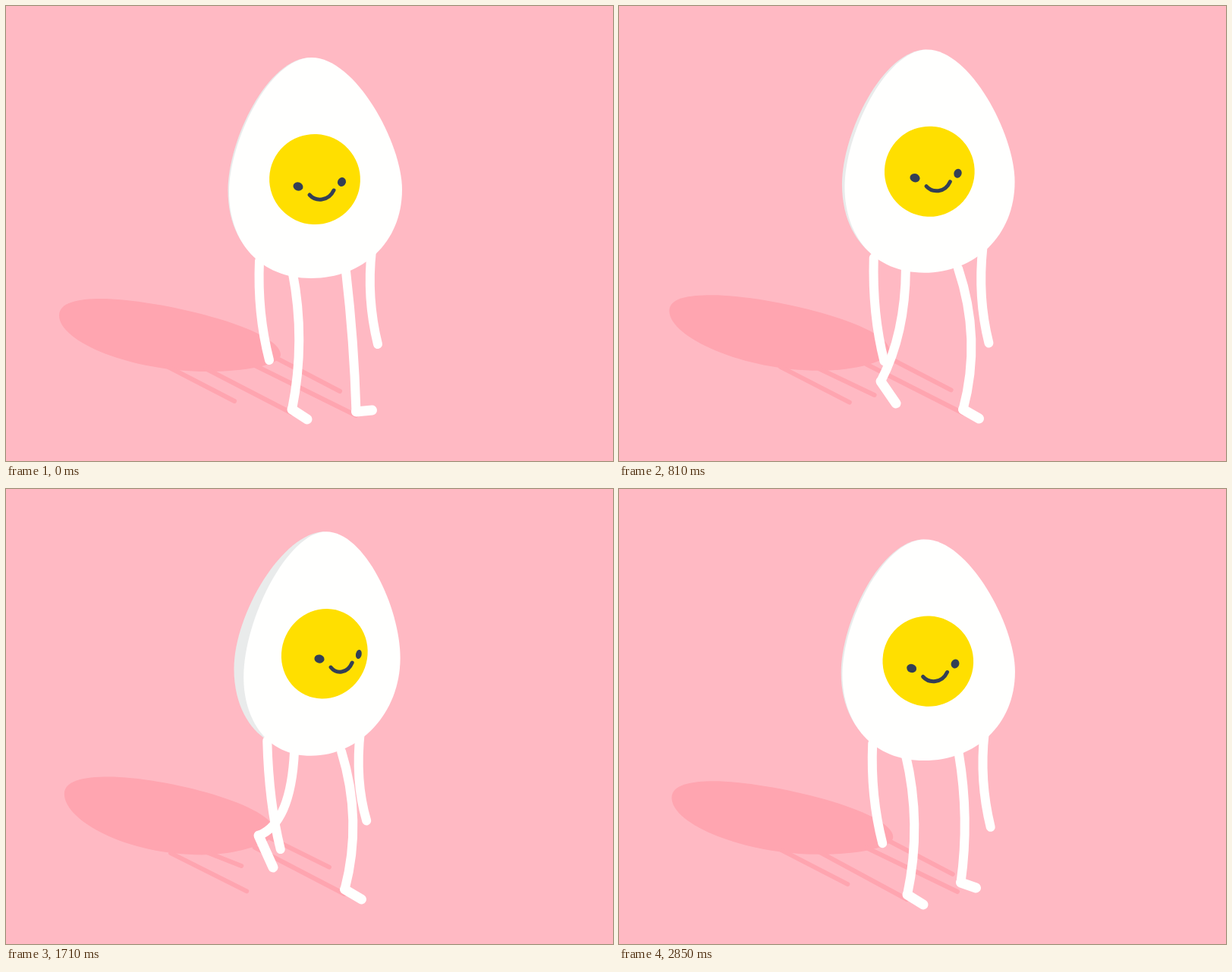
Write an HTML page with a canvas that moves like this. It is 800 px wide and 600 px high and loops after 2.88 s.

```html
<!DOCTYPE html>
<html lang="en">
<head>
<meta charset="utf-8">
<title>Walking egg</title>
<style>
  html, body { margin: 0; width: 100%; height: 100%; overflow: hidden; background: #ffb9c3; }
  canvas { display: block; }
</style>
</head>
<body>
<canvas id="stage" width="800" height="600"></canvas>
<script>
const ctx = document.getElementById('stage').getContext('2d');
const CYCLE = 720, STEP = 30;
const PINK = '#ffb9c3', SHADOW = '#ffa5b0', WHITE = '#fffffe', GREY = '#e9ebeb', YOLK = '#ffdf00', INK = '#333f56';

// Left leg over one stride: time, ankle x y, toe dx dy, bend dx dy, shadow drop
const STRIDE = [
  [0, 377, 532, 20, 13, 18, 0, 5],
  [90, 345, 495, 20, 29, 16, 12, 18],
  [180, 327, 450, 19, 41, 18, 36, 38],
  [270, 333, 457, 19, 42, 19, 39, 40],
  [330, 386, 527, 20, 7, 13, 0, 12],
  [360, 397, 543, 21, -2, 4, 0, 5],
  [450, 389, 540, 21, 12, 28, 0, 5],
  [630, 382, 536, 22, 13, 26, 0, 6],
  [690, 380, 535, 21, 13, 21, 0, 6]
];

// Egg outlines facing left and facing right
const FRONT = [
  'M403 68C460 68 522 180 522 242C522 312 470 359 402 359C335 359 294 312 294 245C294 180 346 68 403 68Z',
  'M427 66C475 66 519 161 519 229C519 301 465 359 402 359C345 359 318 311 318 259C318 181 378 66 427 66Z'
];
const SIDE = [
  'M402 68C344 68 292.5 178 292.5 243C292.5 290 312 320 335 337L402 200Z',
  'M425 66C370 66 302.5 173 302.5 246C302.5 296 325 326 345 338L402 200Z'
];

function strideKey(i) {
  const n = STRIDE.length, lap = Math.floor(i / n), key = STRIDE[i - lap * n];
  return [key[0] + lap * CYCLE, ...key.slice(1)];
}

// Smooth periodic curve through the stride keys
function strideAt(t) {
  t %= CYCLE;
  let i = STRIDE.length - 1;
  while (STRIDE[i][0] > t) i--;
  const [p, a, c, d] = [-1, 0, 1, 2].map(k => strideKey(i + k));
  const span = c[0] - a[0], f = (t - a[0]) / span, f2 = f * f, f3 = f2 * f;
  return a.slice(1).map((_, j) => {
    const k = j + 1;
    const m0 = (c[k] - p[k]) / (c[0] - p[0]) * span;
    const m1 = (d[k] - a[k]) / (d[0] - a[0]) * span;
    return (2 * f3 - 3 * f2 + 1) * a[k] + (f3 - 2 * f2 + f) * m0 + (3 * f2 - 2 * f3) * c[k] + (f3 - f2) * m1;
  });
}

function morph([from, to], amount, bob) {
  const ends = to.match(/[\d.]+/g);
  let i = 0;
  return from.replace(/[\d.]+/g, n => {
    const v = +n + (ends[i] - n) * amount;
    return (i++ % 2 ? v - bob * (20.5 - (v - 68) * 0.0206) : v) + ' ';
  });
}

function fill(path, color) {
  ctx.fillStyle = color;
  ctx.fill(new Path2D(path));
}

function stroke(path, width, color) {
  ctx.lineWidth = width;
  ctx.strokeStyle = color;
  ctx.stroke(new Path2D(path));
}

function oval(x, y, rx, ry, degrees, color) {
  ctx.fillStyle = color;
  ctx.beginPath();
  ctx.ellipse(x, y, rx, ry, degrees * Math.PI / 180, 0, 7);
  ctx.fill();
}

function makeLeg(t, hipX, hipY, dx, dy) {
  const [ax, ay, toeX, toeY, bendX, bendY, drop] = strideAt(t);
  const x = ax + dx, y = ay + dy;
  return {
    body: `M${hipX} ${hipY}Q${(hipX + x) / 2 + bendX} ${(hipY + y) / 2 + bendY} ${x} ${y}`,
    foot: `M${x} ${y}l${toeX} ${toeY}`,
    shadowEnd: `${x - 0.65 * (drop - 5)} ${y + drop}`
  };
}

function drawShadow(s, u, b, left, right) {
  const lx = 70 + 17 * s - 12 * b, ly = 408 - 12 * b;
  const tx = 125 + 20 * s - 10 * b, ty = 386 - 9 * b - 2.5 * s;
  const rx = 362 - 3.5 * s - 10 * b, ry = 460 - 10 * b - 4 * s;
  const bx = 265 - 9 * s, by = 482 - 3 * b + 2.5 * s;
  fill(`M${lx} ${ly}C${lx} ${ly - 17} ${lx + 25} ${ty} ${tx} ${ty}
    C${tx + 74} ${ty} ${rx} ${ry - 35} ${rx} ${ry}
    C${rx} ${ry + 14} ${bx + 48} ${by} ${bx} ${by}
    C${bx - 100} ${by} ${lx} ${ly + 35} ${lx} ${ly}Z`, SHADOW);
  const limbs = [
    `M${212 + 6 * u} ${475 + 6 * u}L${301 + 19 * u} ${521 + 11 * u}`,
    `M350 461L${440 - 16.5 * u} ${508 - 11 * u}`,
    `M${263 + 4 * u} ${478 + 2 * u}L${left.shadowEnd}`,
    `M${326 + 2 * u} ${473 - b}L${right.shadowEnd}`
  ];
  for (const limb of limbs) stroke(limb, 6, SHADOW);
}

function drawFace(s, b) {
  const rise = -21.5 * b - 4.2 * s;
  oval(407 + 16.9 * s, 228.5 - 20 * b - 1.7 * s, 60 - 5 * s, 59.5 + 0.5 * s, 25, YOLK);
  oval(385 + 37 * s, 238 + rise, 6.6, 5.6, 20 - 12 * s, INK);
  oval(442.5 + 29.6 * s, 232 + rise, 5.4 - 2.1 * s, 6.1, 20 - 12 * s, INK);
  const x0 = 400 + 37 * s, w = 32 - 5 * s, y0 = 249 + rise;
  stroke(`M${x0} ${y0}C${x0 + w * 0.25} ${y0 + 9} ${x0 + w * 0.78} ${y0 + 9} ${x0 + w} ${y0 - 6}`, 5, INK);
}

function draw(t) {
  const a = 2 * Math.PI * t / CYCLE;
  const ease = n => 1 - Math.cos(n * a);
  const u = ease(1) / 2;                                             // arm swing
  const s = 0.463 * ease(1) - 0.0413 * ease(2) + 0.024 * ease(3);    // egg turn
  const b = ease(2) / 2;                                             // bob

  ctx.fillStyle = PINK;
  ctx.fillRect(0, 0, 800, 600);
  ctx.lineCap = ctx.lineJoin = 'round';

  const hipY = 350 - 8 * b;
  const left = makeLeg(t, 377.5 + 3 * u, hipY, 0, 0);
  const right = makeLeg(t + CYCLE / 2, 448 - 7 * u, hipY, 64.5, -8);
  drawShadow(s, u, b, left, right);

  fill(morph(SIDE, s / 0.946, b), GREY);
  fill(morph(FRONT, s / 0.946, b), WHITE);
  for (const leg of [right, left]) {
    stroke(leg.body, 12, WHITE);
    stroke(leg.foot, 13, WHITE);
  }
  stroke(`M${334 + 12 * u} ${336 - 8 * b}Q${331 + 18 * u} ${405 + 10 * u} ${347 + 17.3 * u} ${467 + 9.5 * u}`, 12, WHITE);
  stroke(`M${482 - 17.5 * u} ${322 - 8 * b}Q${475 - 18 * u} 385 ${490 - 17.3 * u} ${446 - 10 * u}`, 12, WHITE);
  drawFace(s, b);
}

const start = performance.now();
function tick() {
  const t = performance.now() - start;
  draw(Math.floor(t / STEP) * STEP % CYCLE);
  requestAnimationFrame(tick);
}
tick();
</script>
</body>
</html>
```
